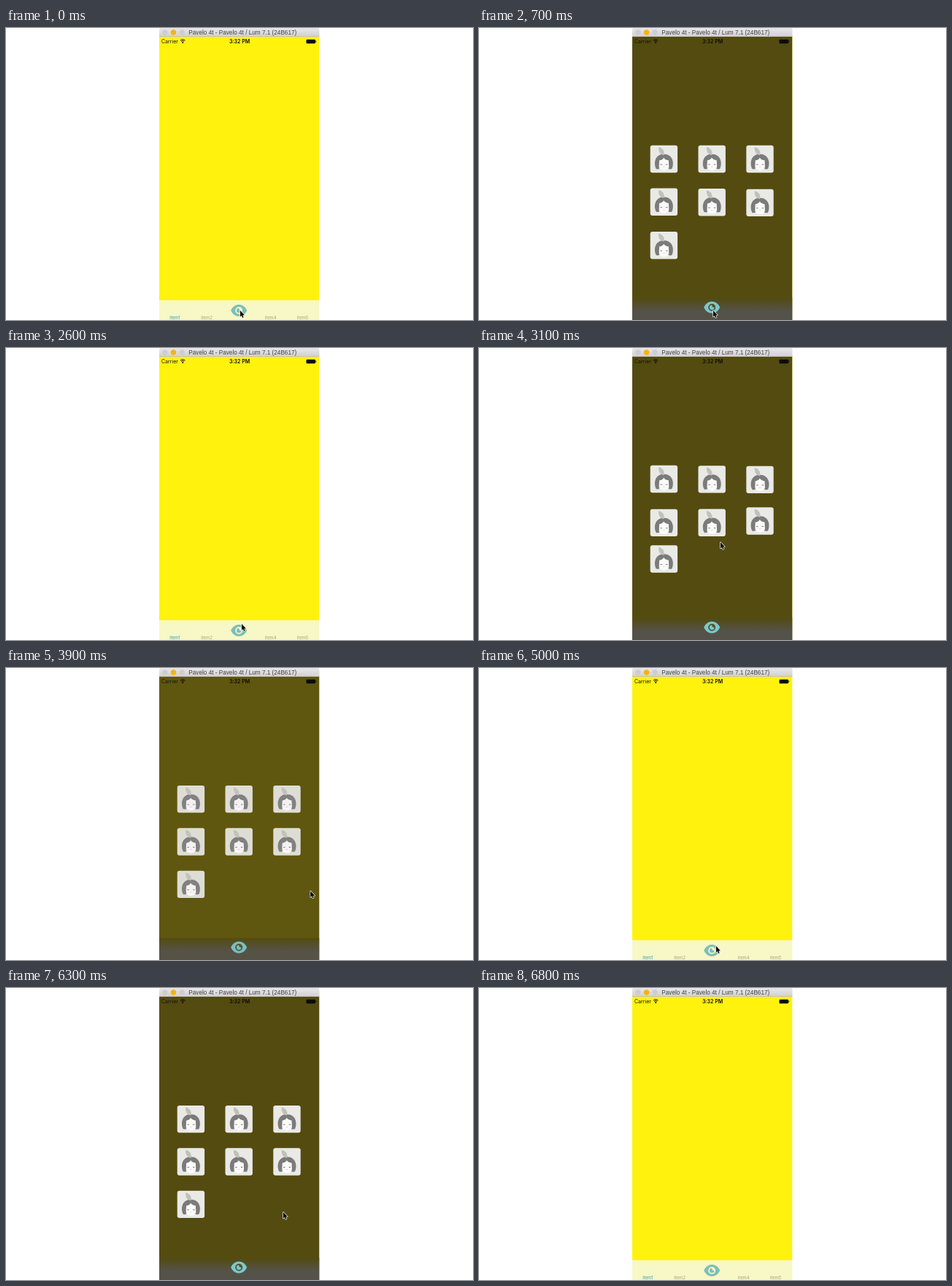
An HTML page with a canvas for the animation above (6900 ms loop, 640 px wide and 400 px high).

```html
<!DOCTYPE html>
<html lang="en">
<head>
<meta charset="utf-8">
<title>Tab menu</title>
<style>
  html, body { margin: 0; width: 100%; height: 100%; overflow: hidden; background: #fff; }
  canvas { display: block; width: 640px; height: 400px; }
</style>
</head>
<body>
<canvas id="stage" width="640" height="400"></canvas>
<script>
const ctx = document.getElementById('stage').getContext('2d');
const LOOP = 6900, TICK = 100;
const LEFT = 210, RIGHT = 429.5, TOP = 12, BAR = 373;
const SANS = 'Inter, "Liberation Sans", sans-serif';

// Each visit of the menu: time it opens, time it starts to close
const VISITS = [[120, 1633], [2600, 3850], [5200, 6370]];
const FADE = 300;

// Pointer path: time, x, y
const PATH = [
  [0, 321, 387], [1000, 321, 387], [1600, 323, 378], [2600, 323, 378],
  [3100, 331, 266], [3500, 396, 288], [3800, 423, 300], [4200, 400, 322],
  [4700, 325, 381], [5250, 325, 381], [5900, 370, 302], [6300, 380, 307],
  [6400, 380, 312], [6700, 372, 404], [6900, 372, 404]
];

const clamp = v => Math.max(0, Math.min(1, v));
const ease = v => v * v * (3 - 2 * v);

function shape(color, build) {
  ctx.fillStyle = color;
  ctx.beginPath();
  build();
  ctx.fill('evenodd');
}

function rect(color, x, y, w, h) {
  ctx.fillStyle = color;
  ctx.fillRect(x, y, w, h);
}

function disc(color, x, y, r) {
  shape(color, () => ctx.arc(x, y, r, 0, 7));
}

function rounded(color, x, y, w, h, r) {
  shape(color, () => ctx.roundRect(x, y, w, h, r));
}

function text(str, x, y, font, color, align = 'center') {
  ctx.font = font;
  ctx.fillStyle = color;
  ctx.textAlign = align;
  ctx.fillText(str, x, y);
}

function shade(y0, y1, from, to) {
  const g = ctx.createLinearGradient(0, y0, 0, y1);
  g.addColorStop(0, from);
  g.addColorStop(1, to);
  return g;
}

function titleBar() {
  rounded(shade(0, TOP, '#e9e7e9', '#d2d0d2'), LEFT, 0, RIGHT - LEFT, TOP, [3, 3, 0, 0]);
  rect('#b9b6a4', LEFT, TOP - 0.6, RIGHT - LEFT, 0.6);
  ['#cfcdcf', '#f7b50c', '#cfcdcf'].forEach((c, i) => disc(c, 217.8 + i * 11.7, 6, 3.7));
  text('Pavelo 4t - Pavelo 4t / Lum 7.1 (24B617)', 324.3, 9,
    '8.2px "Liberation Sans", Arial, sans-serif', '#454345');
}

function statusBar() {
  text('Carrier', 213, 21, '7px ' + SANS, '#14130a', 'left');
  text('3:32 PM', 320, 21, '600 7px ' + SANS, '#0c0b05');
  ctx.strokeStyle = '#0c0b05';
  ctx.lineWidth = 1;
  for (const r of [2.7, 4.5]) {
    ctx.beginPath();
    ctx.arc(242.2, 20.3, r, -Math.PI * 0.76, -Math.PI * 0.24);
    ctx.stroke();
  }
  disc('#0c0b05', 242.2, 20.1, 1);
  rounded('#0c0b05', 411.5, 15.8, 12.4, 5.4, 1);
  rect('#0c0b05', 424.3, 17.4, 0.9, 2.2);
}

function eye(x, y, color) {
  ctx.save();
  ctx.translate(x, y);
  shape(color, () => {
    ctx.moveTo(-11, 0);
    ctx.bezierCurveTo(-6.5, -10.6, 6.5, -10.6, 11, 0);
    ctx.bezierCurveTo(6.5, 10.6, -6.5, 10.6, -11, 0);
    ctx.closePath();
    ctx.moveTo(5, 0);
    ctx.arc(0, 0, 5, 0, 7);
  });
  // Pupil with a bite at the upper right
  shape(color, () => {
    ctx.moveTo(0, -3.2);
    ctx.arc(0, 0, 3.2, -Math.PI / 2, 0, true);
    ctx.quadraticCurveTo(0.1, 0.3, 0, -3.2);
  });
  ctx.restore();
}

function screen() {
  rect('#fff20d', LEFT, TOP, RIGHT - LEFT, BAR - TOP);
  rect('#f8f7c6', LEFT, BAR, RIGHT - LEFT, 400 - BAR);
  [[231.3, 1], [275, 2], [362.7, 4], [406.6, 5]].forEach(([x, n]) =>
    text('item' + n, x, 399, '5.9px ' + SANS, n === 1 ? '#2c9dbb' : '#a3a089'));
  eye(319.2, 387, '#7dbfba');
}

function avatar(x, y) {
  ctx.save();
  ctx.translate(x - 18.7, y - 18.7);
  rounded('#e9e9e6', 0, 0, 37.4, 37.4, 3);
  shape('#7b7b7b', () => {
    ctx.moveTo(8, 32);
    ctx.bezierCurveTo(4.5, 25, 6, 12, 18.6, 12);
    ctx.bezierCurveTo(31.5, 12, 33, 25, 29.8, 32);
    ctx.quadraticCurveTo(26, 33.5, 24, 31);
    ctx.lineTo(13, 31);
    ctx.quadraticCurveTo(11, 33.5, 8, 32);
  });
  shape('#fbfbfa', () => {
    ctx.moveTo(12.4, 20.5);
    ctx.quadraticCurveTo(17, 20, 18.4, 16.8);
    ctx.quadraticCurveTo(20.5, 20, 25.2, 20.5);
    ctx.lineTo(25.6, 29);
    ctx.bezierCurveTo(25, 36, 12.6, 36, 12, 29);
    ctx.closePath();
  });
  shape('#c0c2ba', () => {
    ctx.moveTo(18.8, 13.5);
    ctx.bezierCurveTo(13, 13, 11, 8, 11.5, 2.5);
    ctx.bezierCurveTo(17, 3.5, 20, 8, 18.8, 13.5);
  });
  rect('#6f6862', 13.8, 25.7, 2.4, 0.9);
  rect('#6f6862', 21.4, 25.7, 2.4, 0.9);
  rect('#d5b9ae', 18, 29, 1.6, 0.8);
  ctx.restore();
}

// Damped rise from below the stage; age in seconds
function spring(age) {
  if (age <= 0) return 400;
  const k = 15.5, w = 17.45;
  return 400 * Math.exp(-k * age) * (Math.cos(w * age) + k / w * Math.sin(w * age));
}

function menu(t) {
  const visit = VISITS.find(([a, b]) => t >= a && t < b + FADE);
  if (!visit) return;
  const [open, close] = visit;
  const leave = 1 - ease(clamp((t - close) / FADE));
  const dim = leave * ease(clamp((t - open) / FADE));

  ctx.globalAlpha = dim;
  rect('#534b10', LEFT, TOP, RIGHT - LEFT, 400 - TOP);
  rect(shade(370, 388, '#534b10', '#55524a'), LEFT, 370, RIGHT - LEFT, 30);

  ctx.globalAlpha = leave;
  for (let i = 0; i < 7; i++) {
    const rise = spring((t - open) / 1000 - i * 0.04);
    avatar(253.4 + (i % 3) * 65.8, 179.6 + Math.floor(i / 3) * 58.4 + rise);
  }
  ctx.globalAlpha = dim;
  eye(319.2, 382.8, '#79c9c9');
  ctx.globalAlpha = 1;
}

function pointer(t) {
  const n = PATH.findIndex(p => p[0] > t);
  const [t0, x0, y0] = PATH[n - 1], [t1, x1, y1] = PATH[n];
  const f = (t - t0) / (t1 - t0);
  ctx.save();
  ctx.translate(x0 + (x1 - x0) * f, y0 + (y1 - y0) * f);
  ctx.beginPath();
  [[0, 0], [0, 8.6], [1.9, 6.9], [3.2, 9.9], [4.6, 9.3], [3.3, 6.4], [5.9, 6.2]]
    .forEach(([x, y]) => ctx.lineTo(x, y));
  ctx.closePath();
  ctx.lineWidth = 1.3;
  ctx.lineJoin = 'round';
  ctx.strokeStyle = '#f4f4f0';
  ctx.stroke();
  ctx.fillStyle = '#0a0a0a';
  ctx.fill();
  ctx.restore();
}

function draw(t) {
  rect('#fff', 0, 0, 640, 400);
  ctx.save();
  ctx.beginPath();
  ctx.rect(LEFT, TOP, RIGHT - LEFT, 400 - TOP);
  ctx.clip();
  screen();
  menu(t);
  statusBar();
  ctx.restore();
  titleBar();
  pointer(t);
}

const start = performance.now();
function frame() {
  const t = (performance.now() - start) % LOOP;
  draw(Math.floor(t / TICK) * TICK);
  requestAnimationFrame(frame);
}
frame();
</script>
</body>
</html>
```
